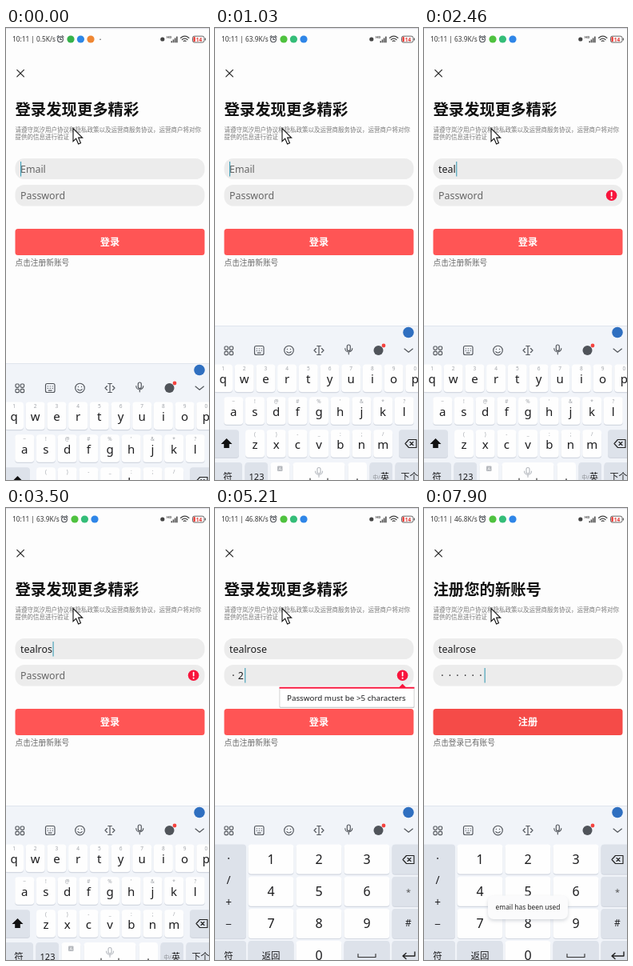
An HTML page for the animation above (8 s loop, 254 px wide and 565 px high).

```html
<!DOCTYPE html>
<html lang="zh">
<head>
<meta charset="utf-8">
<title>Login form</title>
<style>
html, body { margin: 0; width: 100%; height: 100%; overflow: hidden; background: #fdfdfd; }
svg { display: block; width: 100%; height: 100%; }
text { font-family: "Noto Sans", "Noto Sans CJK SC", sans-serif; white-space: pre; }
.mid { text-anchor: middle; }
.icon { fill: none; stroke: #50545a; stroke-width: 1.15; stroke-linecap: round; stroke-linejoin: round; }
</style>
</head>
<body>
<svg id="stage" viewBox="0 0 254 565" xmlns="http://www.w3.org/2000/svg"></svg>
<script>
const LOOP = 8000;
const INK = '#1c1c1e', GREY = '#dde2ea', KEY = '#fefefe', DOWN = '#dce1e8';

const text = (x, y, size, str, more = '') =>
  `<text x="${x}" y="${y}" font-size="${size}" ${more}>${str}</text>`;
const mid = (x, y, size, str, fill = INK, more = '') =>
  text(x, y, size, str, `class="mid" fill="${fill}" ${more}`);
const box = (x, y, w, h, r, fill, more = '') =>
  `<rect x="${x}" y="${y}" width="${w}" height="${h}" rx="${r}" fill="${fill}" ${more}/>`;
const disc = (x, y, r, fill, more = '') =>
  `<circle cx="${x}" cy="${y}" r="${r}" fill="${fill}" ${more}/>`;
const icon = (d, more = '') => `<path class="icon" d="${d}" ${more}/>`;
const key = (x, y, w, h, fill, id = '') =>
  box(x, y + 1.2, w, h, 4, '#d3d8e1') + box(x, y, w, h, 4, fill, id && `id="key-${id}"`);

// Keyboard parts
function letterRow(chars, hints, cx, y) {
  return [...chars].map((c, i) => {
    const x = cx + i * 26.7;
    return key(x - 12, y, 24, 34.5, KEY, c) +
      mid(x, y + 7.5, 6.5, hints[i], '#a0a4aa') +
      mid(x, y + 23.5, 15, c);
  }).join('');
}

const erase = (x, y) =>
  icon(`M${x - 7} ${y}l4.5 -5h9.5v10h-9.5zM${x - 1} ${y - 2}l4 4m0 -4l-4 4`, 'style="stroke:#222"');
const enter = (x, y) =>
  icon(`M${x + 8} ${y - 5}v5h-15m4 -3.5l-4 3.5l4 3.5`, 'style="stroke:#222;stroke-width:1.4"');
const space = (x, y) =>
  icon(`M${x - 11} ${y - 2}v4h22v-4`, 'style="stroke:#333"');
const mic = (x, y, more = '') =>
  icon(`M${x - 2} ${y - 4}a2 2 0 0 1 4 0v3.5a2 2 0 0 1 -4 0zM${x - 4.5} ${y - 1.5}a4.5 4.5 0 0 0 9 0M${x} ${y + 3}v2.8`, more);

function toolbar() {
  const grid = [[12, 398], [18.3, 398], [12, 404.3], [18.3, 404.3]]
    .map(([x, y]) => `<rect class="icon" x="${x}" y="${y}" width="4.3" height="4.3" rx="1.2"/>`).join('');
  return grid +
    '<rect class="icon" x="49.5" y="397.5" width="11.5" height="11" rx="2"/>' +
    icon('M52.3 400.8h.1m2.8 0h.1m2.8 0h.1m-5.9 2.6h.1m2.8 0h.1m2.8 0h.1m-5 2.7h4') +
    disc(92.5, 403, 5.8, 'none', 'class="icon"') +
    icon('M90.4 401.2v.4m4.2 -.4v.4M89.8 404.6q2.7 2.8 5.4 0') +
    icon('M127.7 397.5h4.6m-2.3 0v11m-2.3 0h4.6M126.5 400.5l-2.5 2.5l2.5 2.5M133.5 400.5l2.5 2.5l-2.5 2.5') +
    mic(167.3, 402) +
    disc(204.5, 403, 6, '#50545a') + disc(211, 397, 2.4, '#f5433f') +
    icon('M237 401l5.2 4.2l5.2 -4.2') +
    disc(242, 380.5, 6.8, '#2f6fc0');
}

function letters() {
  return letterRow('qwertyuiop', '1234567890', 10, 420.5) +
    letterRow('asdfghjkl', '~!@#%\'&amp;*?'.replace('&amp;', '&'), 23.2, 461.3) +
    letterRow('zxcvbnm', '()-_:;/', 50, 502.2) +
    key(-4, 502.2, 34, 34.5, GREY) +
    '<path d="M14.5 513l7 7h-3.7v5h-6.6v-5h-3.7z" fill="#111"/>' +
    key(230, 502.2, 30, 34.5, GREY) + erase(245, 519.5) +
    key(-4, 543, 38, 34, GREY) + mid(16, 564.5, 11.5, '符') +
    key(37.5, 543, 28.5, 34, GREY, 'num') + mid(52, 564.5, 11, '123') +
    key(69.5, 543, 24, 34, KEY) +
    box(78, 547.5, 6.5, 6.5, 1, '#b5b8bd') + mid(81.2, 553, 5.5, 'A', '#fff') +
    key(97.5, 543, 65, 34, KEY) + mic(130, 555.5, 'style="stroke:#b4b8be"') + space(130, 565) +
    key(166.5, 543, 23.5, 34, KEY) + mid(178, 565, 13, '.') +
    key(193.5, 543, 28.5, 34, GREY) + mid(202, 563.5, 7, '中/', '#8a8e94') + mid(212.5, 564.5, 11, '英') +
    key(225.5, 543, 34, 34, GREY) +
    `<g id="next">${mid(243.5, 564.5, 11, '下个')}</g><g id="enter">${enter(243, 561)}</g>`;
}

function numpad() {
  let out = key(-4, 420.5, 43, 117.5, GREY);
  ['·', '/', '+', '−'].forEach((c, i) => out += mid(17, 443 + i * 27.3, 13.5, c));
  for (let n = 0; n < 9; n++) {
    const x = 41.5 + (n % 3) * 60, y = 420.5 + Math.floor(n / 3) * 40.2;
    out += key(x, y, 57, 37, KEY, n + 1) + mid(x + 28.5, y + 24, 16, n + 1);
  }
  for (let i = 0; i < 3; i++) out += key(221.5, 420.5 + i * 40.2, 40, 37, GREY);
  return out + erase(242, 439.5) + mid(242, 484, 11, '*', '#555') +
    mid(242, 523, 12, '#', INK, 'font-weight="500"') +
    key(-4, 541, 43, 34, GREY) + mid(17, 563.5, 11.5, '符') +
    key(41.5, 541, 57, 34, GREY) + mid(70, 563.5, 11.5, '返回') +
    key(101.5, 541, 57, 34, KEY) + mid(130, 564.5, 16, '0') +
    key(161.5, 541, 57, 34, GREY) + space(190, 559.5) +
    key(221.5, 541, 40, 34, GREY) + enter(242, 560);
}

function statusBar() {
  const bars = [0, 1, 2, 3].map(i =>
    box(206.5 + i * 2.2, 16.3 - i * 1.9, 1.5, 2 + i * 1.9, 0, '#444', `id="bar${i}"`)).join('');
  return box(0, 0, 254, 1.2, 0, '#dedfe6') +
    text(8, 17, 8.3, '', 'id="speed" fill="#333" font-weight="500"') +
    '<g id="tray">' +
    disc(68, 14.3, 3.4, 'none', 'class="icon"') + icon('M68 12.4v2.1h1.6M64 11.2l1.6 -1.5M72 11.2l-1.6 -1.5') +
    [81, 93.4, 106].map((x, i) => disc(x, 14, 4.6, '#000', `id="app${i}"`)).join('') +
    '</g>' + disc(118, 14.2, .8, '#555', 'id="more"') +
    disc(195.8, 14, 2.6, '#444') +
    text(201, 13, 4.2, 'HD', 'fill="#444" font-weight="700"') + bars +
    icon('M218.5 12.4q5.2 -4.6 10.4 0M220.4 14.5q3.3 -2.8 6.6 0M222.3 16.4q1.4 -1.2 2.8 0', 'style="stroke:#444;stroke-width:1.3"') +
    box(233.5, 10.2, 14.5, 7.8, 2.2, '#fff', 'stroke="#555" stroke-width=".9"') +
    box(248.7, 12.6, 1.2, 3, .5, '#555') + box(234.4, 11, 2.5, 6.2, 1, '#e8423c') +
    mid(241.5, 16.6, 6.4, '14', '#e0302c', 'font-weight="600"');
}

const caret = (id) => box(18, 167, 1.1, 18.5, 0, '#3d9db6', `id="${id}"`);

const alertParts =
  disc(234.6, 209.3, 6.8, '#f8143c') + box(233.8, 204.8, 1.7, 5.6, .7, '#fff') + disc(234.65, 212.8, 1.05, '#fff');
const popup =
  box(80.5, 225, 169, 25, 1.5, '#c9c9c9') + box(81.3, 225, 167.4, 23.8, 1, '#fff') +
  '<path d="M230 224.5l4.6 -4.8l4.6 4.8z" fill="#f8143c"/>' + box(80.5, 223.8, 169, 1.9, 0, '#f8143c') +
  text(90, 241, 9.8, 'Password must be &gt;5 characters', `fill="${INK}"`);

const stage = document.getElementById('stage');
stage.innerHTML =
  '<defs><filter id="soft" x="-20%" y="-40%" width="140%" height="190%"><feGaussianBlur stdDeviation="2"/></filter></defs>' +
  box(0, 0, 254, 565, 0, '#fdfdfd') + statusBar() +
  icon('M13.8 52.3l8.6 8.6m0 -8.6l-8.6 8.6', 'style="stroke:#222"') +
  text(11.5, 109, 19.35, '', 'id="title" fill="#111" font-weight="600"') +
  text(11.5, 129.7, 7.5, '请遵守岚汐用户协议和隐私政策以及运营商服务协议，运营商户将对你', 'fill="#777"') +
  text(11.5, 139.2, 7.5, '提供的信息进行验证', 'fill="#777"') +
  box(11.5, 163, 237, 26, 11.5, '#ececec') + box(11.5, 196, 237, 26.5, 11.5, '#ececec') +
  text(18, 180.7, 12.4, '', 'id="email"') + text(18, 214, 12.4, '', 'id="pass"') +
  '<g id="dots"></g>' + caret('caret1') + caret('caret2') +
  `<g id="alert">${alertParts}</g>` +
  box(11.5, 251, 237, 33, 3.5, '#f55', 'id="button"') +
  mid(130, 272, 12.2, '', '#fff', 'id="action" font-weight="600"') +
  `<g id="popup">${popup}</g>` +
  text(11.5, 296.6, 9.7, '', 'id="link" fill="#666"') +
  '<g id="board">' + box(0, 372, 254, 200, 0, '#f1f4f9') + box(0, 372, 254, .8, 0, '#dde2ea') +
  toolbar() + `<g id="letters">${letters()}</g><g id="numpad">${numpad()}</g></g>` +
  '<g id="toast">' + box(80, 487, 100, 29, 7, '#8a93a0', 'opacity=".35" filter="url(#soft)"') +
  box(80, 484.5, 100, 29.5, 7, '#fbfbfc') + mid(130, 502, 8.4, 'email has been used', '#222', 'font-weight="500"') + '</g>' +
  '<path d="M84 125.5v16.2l3.7 -3.5l2.9 6.8l2.9 -1.3l-2.9 -6.6h5z" fill="#fff" stroke="#111" stroke-width="1.1"/>';

const el = {};
stage.querySelectorAll('[id]').forEach(n => el[n.id] = n);

// Step tables: [time, value]
const typed = 'tealrose';
const steps = {
  lift: [[0, 47], [130, 14], [270, 3], [400, 0]],
  count: [[0, 0], [1810, 1], [1930, 2], [2200, 3], [2460, 4], [2970, 5], [3100, 6], [3500, 7], [3900, 8]],
  digits: [[0, 0], [5080, 1], [5210, 2], [5470, 4], [5620, 5], [5760, 6]],
  down: [[0, ''], [1680, 't'], [1810, 'e'], [1930, ''], [2060, 'a'], [2200, ''], [2320, 'l'], [2460, ''],
    [3230, 's'], [3500, ''], [3900, 'e'], [4280, ''], [4660, 'num'], [4800, ''], [5080, '1'], [5210, '']],
  caret1: [[0, 1], [270, 0], [770, 1], [1280, 0], [1810, 1], [4540, 0]],
  caret2: [[0, 0], [4540, 1], [6170, 0], [6680, 1], [7070, 0], [7770, 1]],
  speed: [[0, '0.5'], [1030, '63.9'], [4930, '46.8']],
  toast: [[0, [0, 38]], [7340, [.3, 38]], [7470, [.7, 12]], [7620, [1, 0]]]
};
const at = (name, t) => steps[name].reduce((v, s) => s[0] <= t ? s[1] : v, null);

const show = (id, on) => el[id].setAttribute('display', on ? 'inline' : 'none');
const set = (id, name, v) => el[id].setAttribute(name, v);
const write = (id, str) => { if (el[id].textContent !== str) el[id].textContent = str; };
const move = (id, x, y) => set(id, 'transform', `translate(${x} ${y})`);

function drawPassword(n, masked) {
  let out = '';
  for (let i = 0; i < n; i++) {
    const open = i === n - 1 && !masked;
    out += mid(22.8 + i * 9.6, 214, 12.4, open ? i + 1 : '·');
  }
  if (el.dots.dataset.sig !== n + '-' + masked) {
    el.dots.dataset.sig = n + '-' + masked;
    el.dots.innerHTML = out;
  }
}

let held = '';
function press(id) {
  if (id === held) return;
  if (held) set('key-' + held, 'fill', held === 'num' ? GREY : KEY);
  if (id) set('key-' + id, 'fill', id === 'num' ? '#c8cfda' : DOWN);
  held = id;
}

function draw(t) {
  const speed = at('speed', t), wide = speed.length > 3;
  write('speed', `10:11 | ${speed}K/s`);
  move('tray', wide ? 5 : 0, 0);
  show('more', !wide);
  const apps = t < 130 ? ['#36b24a', '#2d86e6', '#ef8733'] : ['#4fc23f', '#34bd78', '#2f86e8'];
  apps.forEach((c, i) => set('app' + i, 'fill', c));
  show('bar3', t < 4280 || t >= 4400);

  const join = t >= 6170;
  write('title', join ? '注册您的新账号' : '登录发现更多精彩');
  write('action', join ? '注册' : '登录');
  write('link', join ? '点击登录已有账号' : '点击注册新账号');
  set('button', 'fill', !join ? '#ff5555' : t >= 6930 && t < 7070 ? '#e8433f' : '#f54b48');

  const n = at('count', t), d = at('digits', t);
  write('email', n ? typed.slice(0, n) : 'Email');
  set('email', 'fill', n ? INK : '#666');
  write('pass', d ? '' : 'Password');
  set('pass', 'fill', '#666');
  drawPassword(d, t >= 7070);
  show('caret1', at('caret1', t));
  set('caret1', 'x', n ? 18.6 + el.email.getComputedTextLength() : 18);
  show('caret2', at('caret2', t));
  set('caret2', 'x', 18 + d * 9.6);
  set('caret2', 'y', 200);
  show('alert', t >= 1810 && d < 6);
  show('popup', t >= 4540 && d < 6);

  move('board', 0, at('lift', t));
  show('letters', t < 4800);
  show('numpad', t >= 4800);
  show('next', t < 4540);
  show('enter', t >= 4540);
  press(at('down', t));

  const [alpha, drop] = at('toast', t);
  set('toast', 'opacity', alpha);
  move('toast', 0, drop);
}

const start = performance.now();
function tick() {
  draw((performance.now() - start) % LOOP);
  requestAnimationFrame(tick);
}
draw(0);
requestAnimationFrame(tick);
</script>
</body>
</html>
```
